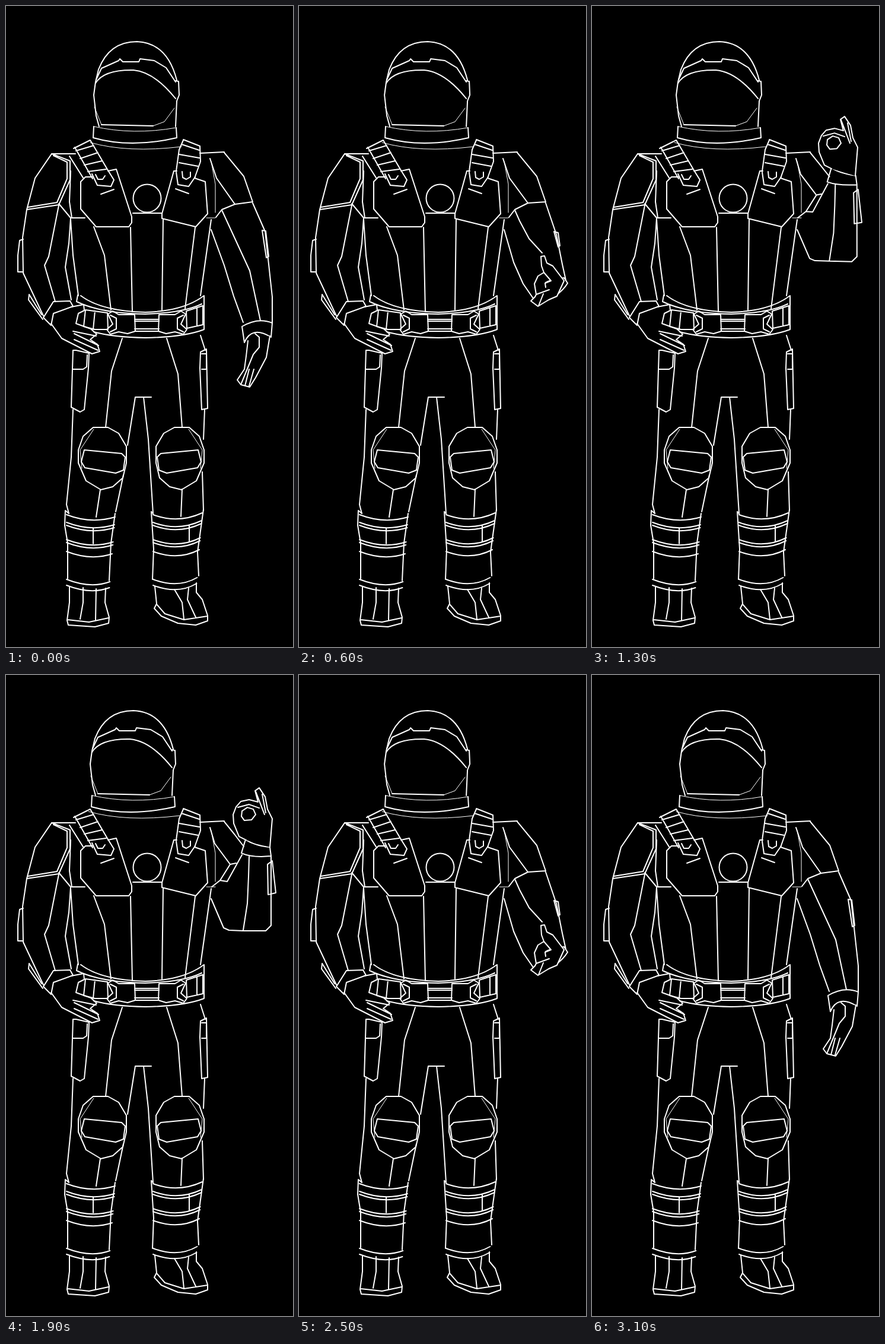
Animation of 484 by 1080 pixels, one loop 3.2 s. Source, as an HTML page:

```html
<!DOCTYPE html>
<html lang="en">
<head>
<meta charset="utf-8">
<title>Astronaut gesture</title>
<style>
html, body { margin: 0; height: 100%; overflow: hidden; background: #000; }
svg { display: block; width: 100vw; height: 100vh; }
path, circle { fill: none; stroke: #fff; stroke-width: 2; stroke-linejoin: round; stroke-linecap: round; }
.thin { stroke-width: 1; }
#hand { fill: #000; }
</style>
</head>
<body>
<svg viewBox="0 0 484 1080">
  <defs>
    <!-- sleeve poses share one structure, so they can be blended -->
    <path id="armDown" d="M368 247 401 287 416 330M344 257 355 290 386 334 416 330M386 334 364 343 354 356M346 377 368 437 384 489 400 533M416 332 437 380 449 490 449 535M364 344 370 357 411 446 429 530M364 344 364 344 364 344M432 378 438 379 443 422 439 424ZM398 540Q425 524 449 534L447 558Q414 538 402 567Z"/>
    <path id="armFist" d="M368 247 401 287 416 330M344 257 355 290 386 332 416 330M386 332 364 343 354 356M346 377 362 432 378 468 398 497M416 332 434 385 444 435 450 462M364 344 372 362 388 392 410 416M364 344 364 344 364 344M430 380 437 382 440 404 437 406ZM400 486Q404 462 447 458L453 467Q440 488 410 500Z"/>
    <path id="armOpen" d="M368 247 398 284 410 318M344 257 353 290 371 326 410 322M371 326 364 343 347 358M345 377 365 438 377 447 404 455M404 455 437 437 450 417 453 381M404 396 402 415 400 430 395 453M364 343 390 365 403 372M440 405 452 392 455 412 437 434ZM402 372Q412 405 453 381L450 376Q425 388 409 364Z"/>
    <path id="armRing" d="M368 247 385 268 401 289M344 257 352 284 378 319 388 317M378 319 361 346 347 357M346 377 367 426 376 430 400 431M400 431 438 431 447 422 447 304M410 306 409 340 407 385 400 430M361 346 373 348 398 303M441 319 449 313 455 367 442 370ZM397 300Q415 308 447 305L445 290Q418 287 404 277Z"/>
    <path id="handDown" d="M408 564 405 590 402 612 390 630 396 638 411 642 421 626 439 592 445 556M420 552 427 558V575L417 587 396 638M410 612 403 640M418 612 410 640"/>
    <path id="handFist" d="M398 490 391 497 403 506 421 495 435 489 447 463 428 438 418 433 414 421 408 422 409 438 413 449 403 455 397 468 400 486ZM413 449 425 463 415 467 416 474M400 486 422 478M404 505 412 485"/>
    <path id="handOpen" d="M410 364 412 354 402 341 410 332 409 317 404 298 412 288 418 290 432 312 450 363 451 377 431 383 414 377ZM412 294 422 330M418 292 427 320M403 338 420 352M409 318 415 335"/>
    <path id="handRing" d="M405 278 393 272 384 250 383 235 388 222 396 213 410 210 425 214 420 195 427 190 437 205 441 226 449 242 445 290M398 229 407 223 417 226 421 235 414 244 402 245 397 238ZM391 223 410 218 427 224M421 196 436 235M432 201 438 232"/>
  </defs>

  <g id="head">
    <path d="M151 128 156 107Q174 60 221 60 272 62 288 125M151 128 148 150 152 185 157 203M286 126 291 127 292 150 288 160 286 203"/>
    <path d="M152 124 161 105 190 92 192 89 197 94H224L226 89 250 92 270 104 286 128M151 130Q165 107 215 108 250 111 286 156M161 200 248 202"/>
    <path class="thin" d="M248 202 267 195 284 172M149 170 161 200"/>
  </g>
  <g id="collar">
    <path d="M148 203 147 222Q210 240 288 222L287 205"/>
    <path class="thin" d="M148 203Q215 218 287 205M142 230Q205 248 296 237"/>
  </g>

  <!-- straps, chest plates -->
  <path d="M114 240 142 226 172 277M116 238 146 291M118 244 148 235M125 257 155 247M132 268 162 261M138 279 169 275"/>
  <path d="M145 283 154 302 177 304 182 293 172 277M151 284 155 292H163L167 286"/>
  <path d="M299 225 327 236 328 262 318 290M299 226 292 242 287 278M296 233 326 243M292 250 326 256M292 264 324 270"/>
  <path d="M287 280 290 301 308 304 319 288M297 279 298 289 304 292 311 288V280"/>
  <path d="M146 288H134L126 296V342L152 372H207L212 365V355L186 275 172 278M160 317 182 309"/>
  <path d="M288 278H283L263 350V358L320 372 340 350 336 296 318 290M286 308 308 316"/>
  <circle cx="238" cy="324" r="23.5"/>

  <!-- torso -->
  <path d="M77 249H117M107 253 131 291M109 278 107 330 111 357H133M214 349H263M109 360 113 420 122 488M148 372 166 420 177 512"/>
  <path d="M210 373 213 515M265 360 263 512M319 373 302 510M346 360 328 488M327 248 368 246"/>
  <path class="thin" d="M346 262 353 300V348M338 357H353"/>

  <!-- resting arm -->
  <path d="M77 249 49 290 35 343 89 335 108 293V261ZM80 252 103 263V291L86 331 37 339"/>
  <path d="M35 343 28 390 29 450 63 522M89 336 72 422 65 437 83 498M89 333 109 357 106 400 100 440 110 495"/>
  <path d="M29 393 23 395 20 420V448H29M39 486 38 495 62 528M39 486 60 520M63 525 80 498 108 497 113 506 80 518 76 538Z"/>
  <path d="M76 535 94 560 145 586 158 582 154 570 142 562 153 553 143 544 118 535 122 518 132 513 131 503 110 507M113 548 152 556M115 552 156 572M115 562 155 580"/>

  <!-- belt -->
  <path d="M126 488Q160 514 235 516 300 514 334 488V545Q300 558 235 559 180 558 148 549M121 487 119 498Q160 518 235 519 300 517 330 502"/>
  <path d="M134 512 171 517 172 545H150L131 540ZM150 514 147 545M304 514 332 505V537L305 543ZM322 509V538M217 528H258M217 531H258M217 544H258M217 548H258"/>
  <path id="buckle" d="M172 519 180 514 190 520H217L218 548 205 552 190 549 176 553 170 545 180 536ZM176 521 186 526V544L176 549"/>
  <use href="#buckle" transform="matrix(-1 0 0 1 475 0)"/>

  <!-- trousers -->
  <path d="M113 580H118L140 585 139 610 132 680 125 684 110 676ZM328 583 338 578 340 678 330 680 327 610ZM112 612H130L136 608 137 588M330 612H338V586H330"/>
  <path d="M196 560 178 615 168 710M271 560 290 620 297 710M245 659H218L205 740M198 790 185 852M232 659 240 730 248 855M328 555 336 580"/>
  <path d="M335 680 333 730M331 785 333 850M113 680 110 760 102 840 106 855M159 815 152 861M297 814 295 860"/>
  <g id="knee">
    <path d="M147 710H172L190 720 203 742V770L197 795 180 810 160 815 135 800 122 770V748L130 725Z"/>
    <path d="M132 748 195 754 201 760 198 782 185 787 133 778 127 768Z"/>
    <path class="thin" d="M148 713 125 748 128 779"/>
  </g>
  <use href="#knee" transform="matrix(-1 0 0 1 456 0)"/>

  <!-- shins, boots -->
  <path id="bands"/>
  <path d="M106 855 100 850 99 875 104 905V965M184 855 177 905 174 968M147 880V906M248 855 245 852 249 915 247 966M333 848 323 920 325 960M309 876V903"/>
  <path d="M107 978V1005L103 1035 105 1043 150 1046 173 1040 174 1030 167 1005 168 981M104 1034 140 1038 173 1031M130 980V1005L125 1033M152 982 151 1035"/>
  <path d="M251 978 254 1007 250 1015 262 1028 290 1040 320 1043 340 1036V1027L331 1000 321 988V972M254 1008 268 1024 300 1034 340 1028M284 983 297 1005 300 1033M308 981 306 1000 320 1030"/>

  <path id="arm"/>
  <path id="hand"/>
</svg>
<script>
const $ = id => document.getElementById(id);
const mix = (a, b, u) => a + (b - a) * u;
const shape = id => $(id).getAttribute("d");
const pose = (name, step, x, y) => ({ step, x, y, arm: shape("arm" + name), hand: shape("hand" + name) });

const down = pose("Down", 0, 424, 546), fist = pose("Fist", 6, 424, 475);
const open = pose("Open", 8, 432, 376), ring = pose("Ring", 15, 412, 300);

// Curved bands around both shins
const band = (x, end, lift) => y => `M${x} ${y}Q${(x + end) / 2} ${y + 16} ${end - (y - 857) * .08} ${y + lift}`;
const levels = [857, 870, 875, 899, 904, 919, 966, 976];
$("bands").setAttribute("d", [band(102, 184, 4), band(248, 331, -3)].flatMap(b => levels.map(b)).join(""));

function mixPath(a, b, u) {
  const to = b.match(/\d+/g);
  let n = 0;
  return a.replace(/\d+/g, v => mix(+v, +to[n++], u).toFixed(1));
}

function draw(step) {
  const [a, b] = step < 6 ? [down, fist] : step < 8 ? [fist, open] : [open, ring];
  const v = (step - a.step) / (b.step - a.step);
  const u = a === down ? v ** 3 : a === fist ? v : 1.07 * (1 - (1 - v) ** 3.2);   // slow start, slow end
  const near = u < .5 ? a : b;
  $("arm").setAttribute("d", mixPath(a.arm, b.arm, u));
  $("hand").setAttribute("d", near.hand);
  $("hand").setAttribute("transform", `translate(${mix(a.x, b.x, u) - near.x} ${mix(a.y, b.y, u) - near.y})`);

  const h = Math.min(step / 10, 1), turn = -6 * h * h * (3 - 2 * h);
  $("head").setAttribute("transform", `translate(${turn})`);
  $("collar").setAttribute("transform", `translate(${turn / 2})`);
}

function frame(now) {
  const i = Math.floor(now / 100) % 32;
  draw(i < 16 ? i : 31 - i);   // there and back
  requestAnimationFrame(frame);
}
draw(0);
requestAnimationFrame(frame);
</script>
</body>
</html>
```
